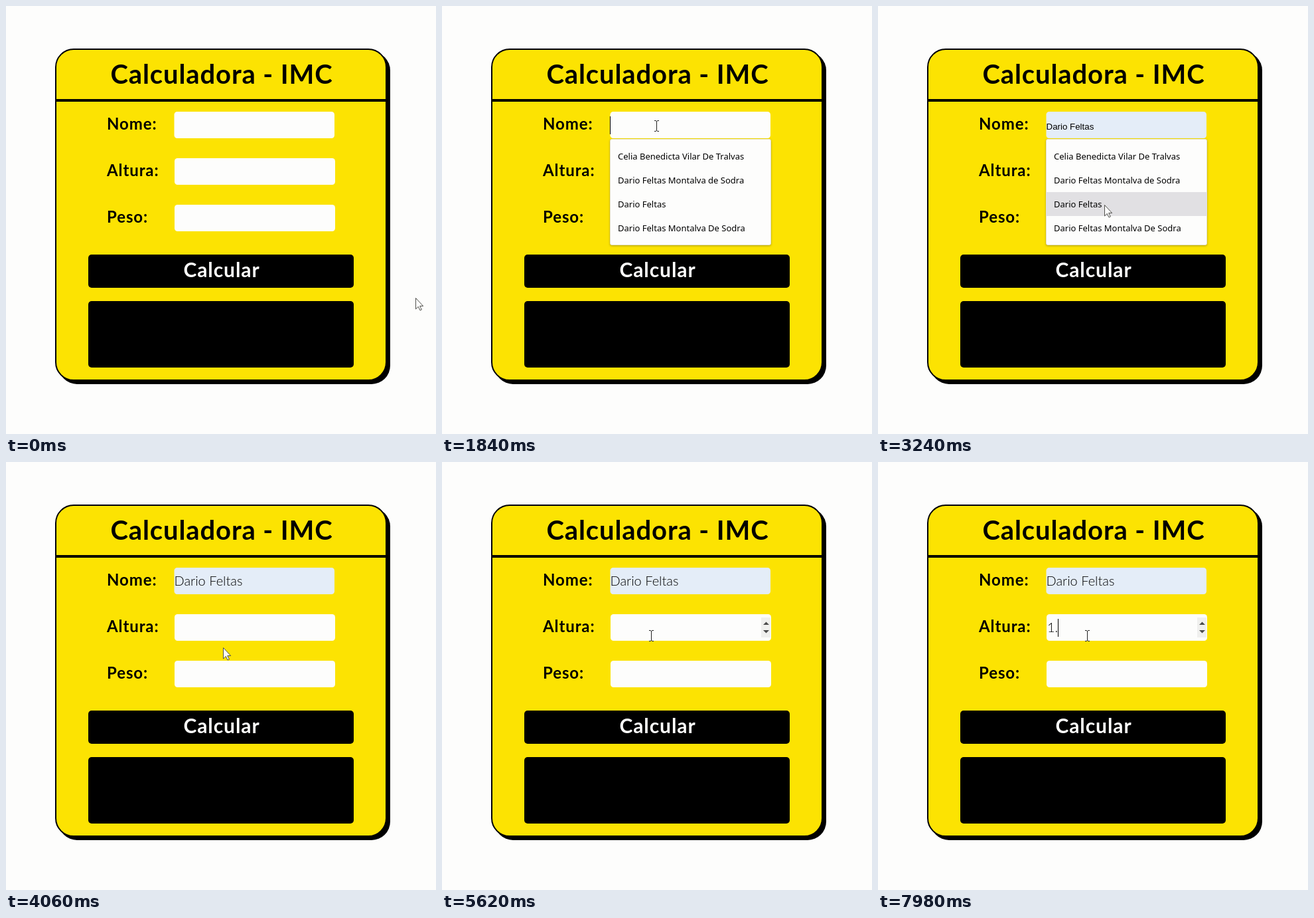
These frames come from a looping animation (648x644 px, 8 s). An HTML page:

```html
<!DOCTYPE html>
<html lang="pt">
<head>
<meta charset="utf-8">
<title>Calculadora - IMC</title>
<style>
  html, body { margin: 0; width: 100%; height: 100%; overflow: hidden; background: #fdfdfc; }
  svg { display: block; width: 100vw; height: 100vh; }
  text { white-space: pre; }
  .bold { font-family: Lato, "Open Sans", sans-serif; font-weight: 700; }
  .value { font: 300 20px Lato, "Open Sans", sans-serif; }
  .preview { font: 13.33px "Liberation Sans", Arial, sans-serif; }
  .item { font: 13px "Noto Sans", "Open Sans", sans-serif; }
  .field { fill: #fdfdfc; }
  .filled { fill: #e4edf8; }
  #popup { filter: drop-shadow(0 1px 1.5px rgba(0, 0, 0, .3)); }
</style>
</head>
<body>
<svg viewBox="0 0 648 644" xmlns="http://www.w3.org/2000/svg">
  <defs>
    <g id="spin">
      <rect x="481" y="5" width="14" height="30" fill="#f0f0ee"/>
      <path d="M484 16l4.500-4.500 4.500 4.500zM484 24l4.500 4.500 4.500-4.500z" fill="#4c4c4c"/>
    </g>
  </defs>
  <rect width="648" height="644" fill="#fdfdfc"/>
  <rect x="79" y="69" width="500" height="500" rx="28"/>
  <rect x="75" y="65" width="498" height="498" rx="27" fill="#fce302" stroke="#000" stroke-width="2"/>
  <rect x="75" y="140" width="498" height="4"/>
  <g class="bold">
    <text x="325" y="117" font-size="40" letter-spacing=".9" text-anchor="middle">Calculadora - IMC</text>
    <g font-size="24" letter-spacing=".9">
      <text x="152" y="186">Nome:</text>
      <text x="152" y="256">Altura:</text>
      <text x="152" y="326">Peso:</text>
    </g>
    <rect x="124" y="374" width="400" height="50" rx="5"/>
    <rect x="124" y="444" width="400" height="100" rx="5"/>
    <text x="325" y="408" font-size="30" letter-spacing=".9" text-anchor="middle" fill="#fdfdfc">Calcular</text>
  </g>
  <rect id="nameBox" x="253.500" y="159" width="241.500" height="40" rx="4.500"/>
  <rect class="field" x="254" y="229" width="242" height="40" rx="4.500"/>
  <rect class="field" x="254" y="299" width="242" height="40" rx="4.500"/>
  <use id="spinHeight" href="#spin" y="229"/>
  <use id="spinWeight" href="#spin" y="299"/>
  <text id="name" x="253.500" y="186"></text>
  <text id="height" class="value" x="255" y="256"></text>
  <rect id="caret" width="1" height="27"/>
  <g id="popup">
    <rect x="253.500" y="200.500" width="242" height="159" rx="2.500" fill="#fdfdfc" stroke="#e6e2cc"/>
    <rect id="hover" x="253" width="243" height="36" fill="#e1e0e3"/>
  </g>
  <path id="arrow" d="M.5 .5V17l3.800-3.600 2.700 5.600 2.400-1.100-2.700-5.400h5z" fill="#fdfdfc" stroke="#50504c"/>
  <path id="beam" d="M-3 -7.500H-1L.5 -6.500 2 -7.500H4M.5 -6.500V7.500M-3 8.500H-1L.5 7.500 2 8.500H4" fill="none" stroke="#222"/>
</svg>
<script>
const LOOP = 8000;
const $ = id => document.getElementById(id);
const show = (id, on) => $(id).setAttribute('display', on ? 'inline' : 'none');
const set = (id, attrs) => { for (const k in attrs) $(id).setAttribute(k, attrs[k]); };

const names = [
  'Celia Benedicta Vilar De Tralvas',
  'Dario Feltas Montalva de Sodra',
  'Dario Feltas',
  'Dario Feltas Montalva De Sodra'
];
const picked = names[2];
const OPEN = 1600, PICK = 3500, FOCUS = 5050, ONE = 7150, DOT = 7650;

// Pointer stops: time, x, y
const stops = [
  [0, 617, 439], [100, 617, 439], [820, 334, 228], [1350, 323, 180], [2350, 323, 180],
  [3050, 341, 299], [3650, 341, 299], [4450, 315, 260], [5000, 315, 260], [5100, 315, 261]
];

names.forEach((label, i) => {
  const el = document.createElementNS('http://www.w3.org/2000/svg', 'text');
  el.setAttribute('class', 'item');
  el.setAttribute('x', 265);
  el.setAttribute('y', 231 + 36 * i);
  el.textContent = label;
  $('popup').append(el);
});

function pointer(t) {
  const i = stops.findIndex(s => s[0] > t);
  if (i < 0) return stops[stops.length - 1].slice(1);
  const [t0, x0, y0] = stops[i - 1], [t1, x1, y1] = stops[i];
  const u = (t - t0) / (t1 - t0), e = u * u * (3 - 2 * u);
  return [x0 + (x1 - x0) * e, y0 + (y1 - y0) * e].map(Math.round);
}

function draw(t) {
  const [x, y] = pointer(t);
  const open = t >= OPEN && t < PICK, chosen = t >= PICK;
  const over = top => x >= 254 && x <= 496 && y >= top - 1 && y <= top + 40;
  const row = open && y >= 208 ? Math.floor((y - 208) / 36) : -1;

  show('popup', open);
  show('hover', row >= 0);
  set('hover', { y: 208 + 36 * Math.max(row, 0) });

  set('nameBox', { class: chosen || row >= 0 ? 'filled' : 'field' });
  set('name', { class: chosen ? 'value' : 'preview' });
  $('name').textContent = chosen ? picked : names[row] || '';
  $('height').textContent = t >= DOT ? '1.' : t >= ONE ? '1' : '';

  show('spinHeight', t >= FOCUS || (!open && over(229)));
  show('spinWeight', !open && over(299));

  const start = [DOT, ONE, FOCUS, PICK, OPEN].find(s => t >= s);
  show('caret', start !== undefined && row < 0 && (t - start) % 1000 < 500);
  const field = t >= FOCUS ? 'height' : 'name';
  const left = field === 'height' ? 255 : 253;
  set('caret', {
    x: Math.round(left + $(field).getComputedTextLength()),
    y: field === 'height' ? 236 : 166
  });

  const beam = over(159) || (!open && (over(229) || over(299)));
  show('beam', beam);
  show('arrow', !beam);
  set(beam ? 'beam' : 'arrow', { transform: `translate(${x} ${y})` });
}

const begin = performance.now();
function tick() {
  draw((performance.now() - begin) % LOOP);
  requestAnimationFrame(tick);
}
tick();
</script>
</body>
</html>
```
